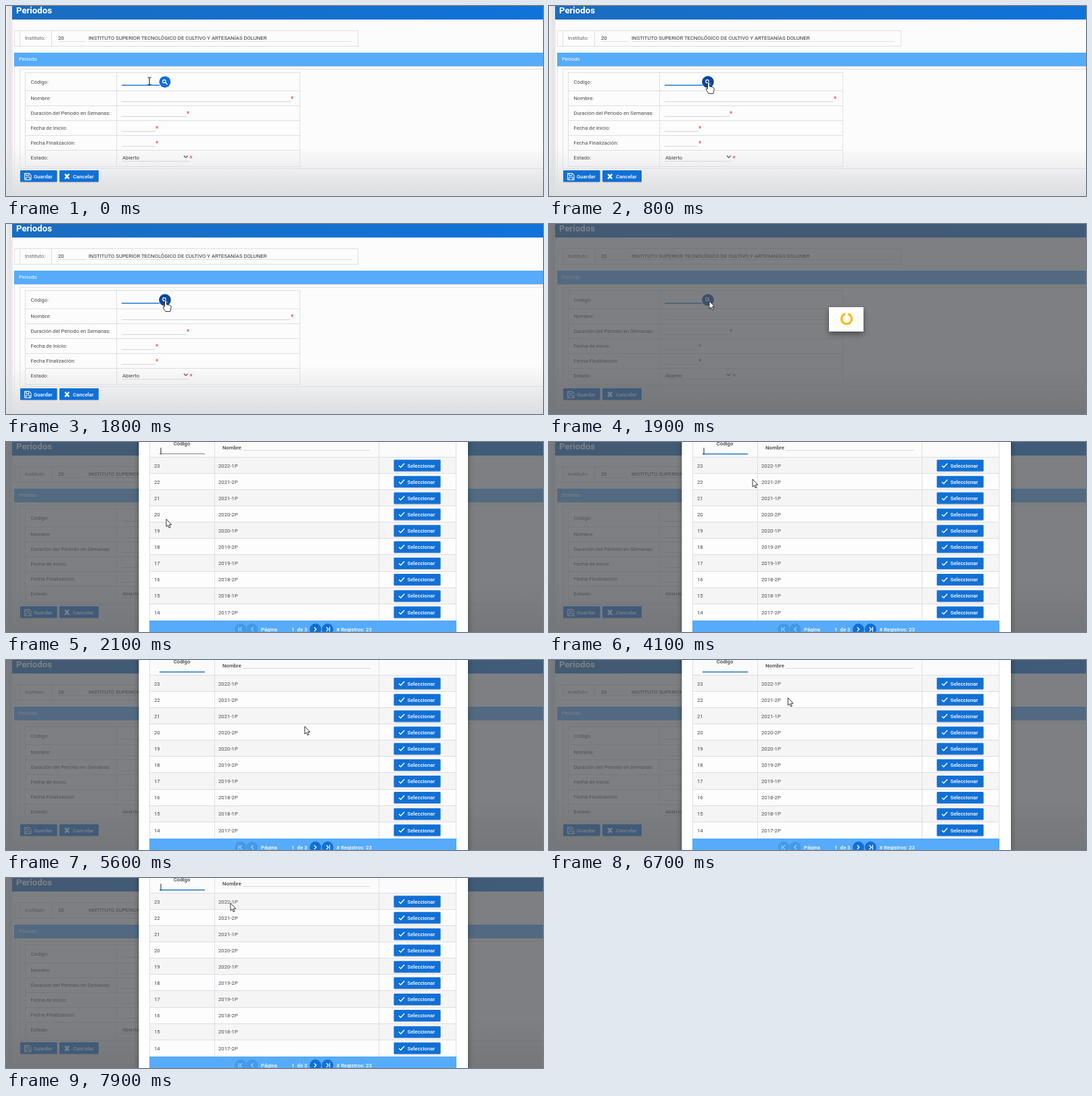
Animation of 794x281 px, one loop 8 s. Source, as an HTML page:

```html
<!DOCTYPE html>
<html lang="es">
<head>
<meta charset="utf-8">
<title>Periodos</title>
<style>
html, body { margin: 0; width: 100%; height: 100%; overflow: hidden; background: #fcfcfc; }
svg { display: block; font: 7.75px Roboto, sans-serif; }
</style>
</head>
<body>
<svg id="stage" width="794" height="281" viewBox="0 0 794 281">
  <defs>
    <linearGradient id="head"><stop stop-color="#1a6dc0"/><stop offset="1" stop-color="#0f73da"/></linearGradient>
    <linearGradient id="edge"><stop stop-color="#f1f1f2"/><stop offset=".6" stop-color="#e3e3e6"/><stop offset="1" stop-color="#ededef"/></linearGradient>
    <linearGradient id="floor" x2="0" y2="1"><stop stop-color="#dcdde0" stop-opacity="0"/><stop offset="1" stop-color="#dcdde0"/></linearGradient>
    <filter id="soft" x="-30%" y="-30%" width="160%" height="180%"><feDropShadow dx="0" dy="4" stdDeviation="4" flood-opacity=".4"/></filter>
  </defs>
  <g id="page"></g>
  <rect id="veil" width="794" height="281" fill="#525458" opacity=".74"/>
  <g id="loader">
    <rect x="414" y="123" width="51" height="36" fill="#fff" filter="url(#soft)"/>
    <path d="M442 133A7.5 7.5 0 1 1 438 133" fill="none" stroke="#fcb91c" stroke-width="3.2"/>
  </g>
  <g id="dialog"></g>
  <g id="pointer" stroke-width=".9" stroke-linejoin="round"></g>
</svg>
<script>
const $ = id => document.getElementById(id);
const BLUE = '#1170d6', DARK = '#0a479c', LINE = '#dfdfe4', SKY = '#56abfa';

const rect = (x, y, w, h, fill, extra = '') =>
  `<rect x="${x}" y="${y}" width="${w}" height="${h}" fill="${fill}" ${extra}/>`;
const box = (x, y, w, h) => rect(x + .5, y + .5, w, h, 'none', `stroke="${LINE}"`);
const text = (x, y, s, fill = '#4c4c4c', extra = '') =>
  `<text x="${x}" y="${y}" fill="${fill}" ${extra}>${s}</text>`;
const stroke = (d, color, w = 1, extra = '') =>
  `<path d="${d}" fill="none" stroke="${color}" stroke-width="${w}" ${extra}/>`;
const bold = 'font-weight="500"';
const button = (x, y, w, extra = '') =>
  rect(x, y + 1.2, w, 17, '#00000030', 'rx="1.5"') + rect(x, y, w, 17, BLUE, 'rx="1" ' + extra);

function drawPage() {
  let s = rect(0, 0, 794, 281, '#fcfcfc') + rect(0, 0, 10, 281, 'url(#edge)')
    + rect(0, 208, 794, 73, 'url(#floor)')
    + rect(9, 0, 785, 20, 'url(#head)')
    + text(15, 10.5, 'Periodos', '#fff', 'font-size="13.2" font-weight="700"')
    + box(12, 36, 508, 23) + box(20, 36, 500, 23) + rect(67, 37, 1, 22, LINE)
    + text(28, 49.6, 'Instituto:', '#6a6a6a') + text(77, 49.6, '20', '#333')
    + text(122, 49.6, 'INSTITUTO SUPERIOR TECNOLÓGICO DE CULTIVO Y ARTESANÍAS DOLUNER', '#333')
    + rect(77, 52, 41, 1, LINE) + rect(122, 52, 389, 1, LINE)
    + rect(12, 69, 782, 20, SKY) + text(19, 81, 'Periodo', '#fff')
    + box(12, 89, 800, 176) + box(20, 93, 800, 147)
    + box(28, 98, 406, 139) + rect(163, 98, 1, 139, LINE);
  const fields = [
    ['Código:', 115, 227], ['Nombre:', 139, 421], ['Duración del Periodo en Semanas:', 161, 267],
    ['Fecha de Inicio:', 183, 221], ['Fecha Finalización:', 205, 221], ['Estado:', 227, 271]];
  fields.forEach(([label, y, end], i) => {
    s += text(36.5, y, label);
    if (i) {
      s += rect(28, [0, 125, 147, 169, 191, 213][i], 406, 1, LINE)
        + rect(171, y + 2, end - 171, 1, '#d6d6da')
        + text(end + (i < 5 ? 0 : .5), y + 1.5, '*', '#e5453d', 'font-size="10"');
    }
  });
  s += rect(171, 116.5, 56, 1.4, '#1a74cf', 'id="field"')
    + `<circle id="find" cx="235" cy="112.3" r="8.4"/>`
    + `<circle cx="234" cy="111.4" r="2.3" fill="none" stroke="#fff" stroke-width="1.2"/>`
    + stroke('M235.8 113.2l2.8 2.8', '#fff', 1.4)
    + text(172, 226.5, 'Abierto', '#3f3f3f') + stroke('M263 221.5l2.8 2.8l2.8 -2.8', '#444', 1.1)
    + button(21, 243, 54.5) + button(79, 243, 58)
    + text(41, 254.5, 'Guardar', '#fff', bold) + text(99, 254.5, 'Cancelar', '#fff', bold)
    + stroke('M27.5 247.5h7l2.5 2.5v7h-9.5zM29.5 247.5v3h4.5v-3M29.5 257v-4h5.5v4', '#fff')
    + stroke('M87.2 248.5l6 7M93.2 248.5l-6 7', '#fff', 2.4);
  return s;
}

const rowY = i => 22.2 + 24.12 * i;

function drawDialog() {
  let s = rect(196.5, -20, 486.5, 330, '#fff', 'filter="url(#soft)"');
  s += rect(212, 0, 454, 23, '#fbfbfb')
    + text(260, 5, 'Código', '#444', 'text-anchor="middle" ' + bold)
    + text(320, 11.2, 'Nombre', '#444', bold) + rect(350, 12, 189, 1, '#dadade')
    + '<rect id="under" x="227" y="17" width="67"/>' + rect(228.5, 8.5, 1, 10, '#222', 'id="caret"');
  for (let i = 0; i < 10; i++) {
    const y = rowY(i), name = `${2022 - Math.ceil(i / 2)}-${i % 2 ? 2 : 1}P`;
    s += rect(212, y, 454, 24.12, i % 2 ? '#fdfdfd' : '#f5f5f6') + rect(212, Math.floor(y), 454, 1, LINE)
      + text(219, y + 15.3, 23 - i) + text(314, y + 15.3, name)
      + button(573.5, y + 4, 69, 'class="pick"')
      + stroke(`M581 ${y + 12.7}l2.6 2.6l5.4 -5.8`, '#fff', 1.4)
      + text(593.5, y + 15.3, 'Seleccionar', '#fff', bold);
  }
  for (const x of [212, 308, 551, 665]) s += rect(x, 0, 1, 264, LINE);
  s += rect(212, 264, 454, 17, SKY);
  const arrows = [[347, -1, 1], [364, -1, 0], [457.5, 1, 0], [475.5, 1, 1]];
  for (const [x, dir, bar] of arrows) {
    const on = dir > 0;
    s += `<circle cx="${x}" cy="277" r="8.5" fill="${on ? BLUE : '#4399ea'}"/>`
      + stroke(`M${x - dir * 1.8} 274l${dir * 3} 3l${-dir * 3} 3` + (bar ? `M${x + dir * 3} 273.5v7` : ''),
        on ? '#fff' : '#a5d2fb', 1.2);
  }
  return s + text(377, 279.5, 'Página', '#fff', bold) + text(422, 279.5, '1', '#fff', bold)
    + text(430.5, 279.5, 'de 3', '#fff', bold) + text(488.5, 279.5, '# Registros: 23', '#fff', bold);
}

const shapes = {
  beam: stroke('M-2.5 -5.5q2.5 0 2.5 1.5q0 -1.5 2.5 -1.5M0 -4v8M-2.5 5.5q2.5 0 2.5 -1.5q0 1.5 2.5 1.5', '#222', 1.1),
  hand: '<path d="M-1.5 1q1.5 -2.6 3 0V6l5 1.2q2 .6 1.7 3L6.8 16.5H0L-3.8 10.5q-.3 -2.4 2.3 -.8z" fill="#fff" stroke="#222"/>',
  arrow: '<path d="M0 0V11.2L2.5 9L4.2 13L6 12.2L4.3 8.3H7.7z" fill="#fff" stroke="#222"/>'
};

// Pointer path: time, x, y
const path = [
  [100, 212, 111], [300, 187, 116], [500, 214, 114], [800, 236, 113], [1800, 236, 113], [1900, 237, 114],
  [2300, 237, 114], [2700, 318, 58], [2900, 318, 58], [3150, 245, 150], [3350, 300, 238], [3550, 540, 210],
  [3700, 612, 84], [3850, 420, 50], [3950, 245, 60], [4100, 301, 55], [5200, 301, 55], [5600, 441, 98],
  [5700, 520, 118], [5850, 612, 38], [6100, 385, 74], [6500, 385, 74], [6900, 322, 38], [7100, 322, 38],
  [7400, 455, 62], [7700, 331, 36], [7800, 331, 36], [7900, 332, 37]];

function pointerAt(t) {
  const i = path.findIndex(k => k[0] > t);
  if (i === 0) return path[0].slice(1);
  if (i < 0) return path[path.length - 1].slice(1);
  const [a, b] = [path[i - 1], path[i]], f = (t - a[0]) / (b[0] - a[0]);
  return [1, 2].map(n => a[n] + (b[n] - a[n]) * f);
}

$('page').innerHTML = drawPage();
$('dialog').innerHTML = drawDialog();
const picks = [...document.querySelectorAll('.pick')];
const show = (id, on) => $(id).setAttribute('visibility', on ? 'visible' : 'hidden');
let kind = '';

function render(t) {
  const [x, y] = pointerAt(t), modal = t >= 1890, listed = t >= 1990, focused = t >= 2190;
  const onFind = Math.hypot(x - 235, y - 112) < 9 && !listed;
  const hit = listed && x > 573 && x < 643
    ? picks.findIndex((_, i) => y > rowY(i) + 4 && y < rowY(i) + 21) : -1;

  show('veil', modal);
  show('loader', modal && !listed);
  $('dialog').style.display = listed ? '' : 'none';
  $('dialog').setAttribute('opacity', Math.min(1, Math.max(.5, (t - 1950) / 130)));
  $('field').setAttribute('fill', listed ? '#d6d6da' : '#1a74cf');
  $('find').setAttribute('fill', onFind ? DARK : BLUE);
  $('find').setAttribute('r', onFind ? 8.8 : 8.4);
  $('under').setAttribute('fill', focused ? '#1a6fc4' : '#888');
  $('under').setAttribute('height', focused ? 1.4 : 1);
  $('caret').setAttribute('opacity', Math.floor((t - 2000) / 486) % 2 ? 0 : 1);
  picks.forEach((p, i) => p.setAttribute('fill', i === hit ? DARK : BLUE));

  const next = modal ? (hit < 0 ? 'arrow' : 'hand') : onFind ? 'hand' : 'beam';
  if (next !== kind) $('pointer').innerHTML = shapes[kind = next];
  $('pointer').setAttribute('transform', `translate(${x} ${y})`);
}

const start = performance.now();
(function tick() {
  render((performance.now() - start) % 8000);
  requestAnimationFrame(tick);
})();
</script>
</body>
</html>
```
